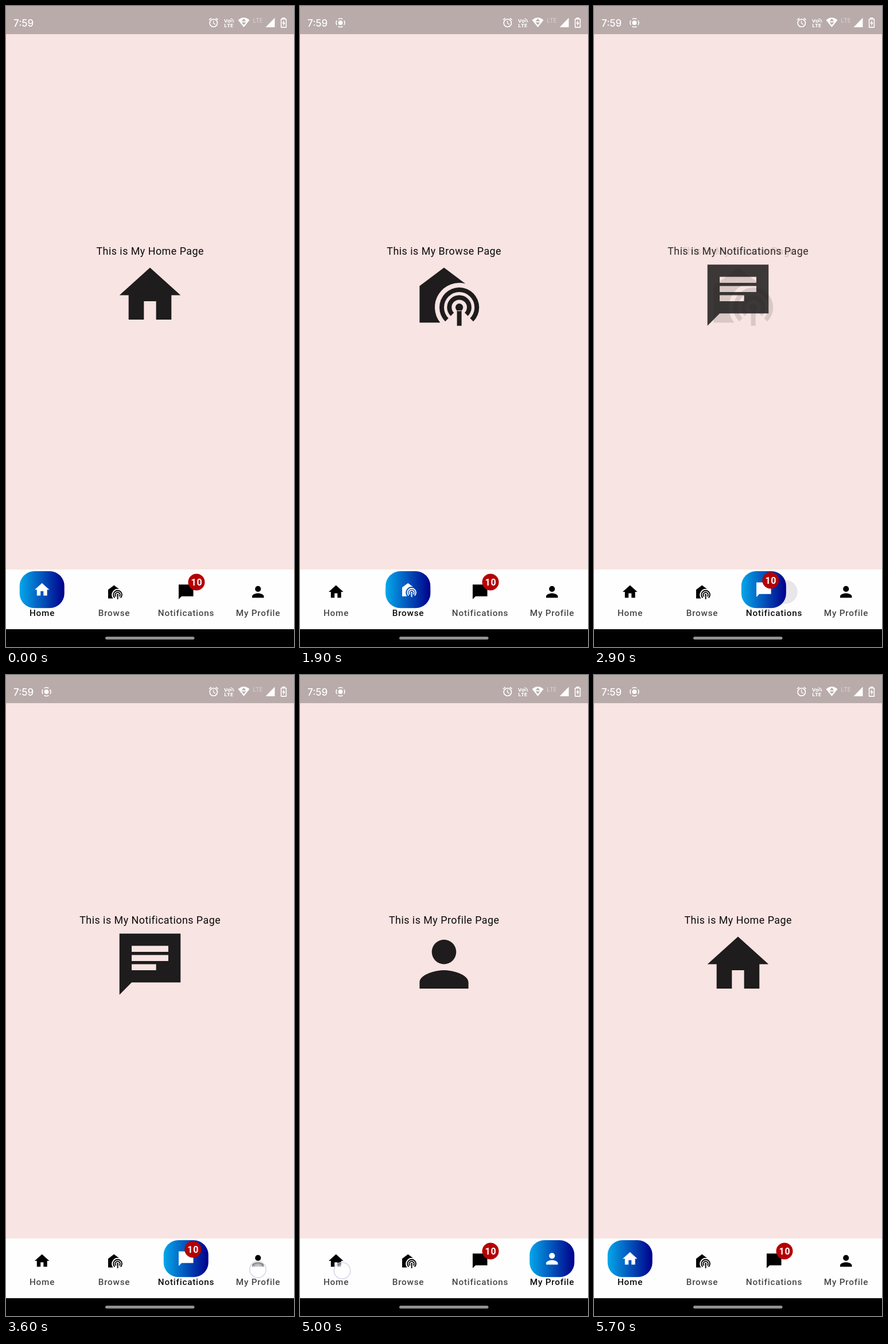
These frames come from a looping animation (502 px wide and 1116 px high, 7.1 s). An HTML page with a canvas:

```html
<!DOCTYPE html>
<html lang="en">
<head>
<meta charset="utf-8">
<title>Bottom navigation</title>
<style>
  html, body { margin: 0; width: 100%; height: 100%; overflow: hidden; }
  canvas { display: block; width: 502px; height: 1116px; }
</style>
</head>
<body>
<canvas id="stage" width="502" height="1116"></canvas>
<script>
const ctx = document.getElementById('stage').getContext('2d');
const LOOP = 7100, STEP = 100, DP = 1.278;
const INK = '#1e1c1d', ROBOTO = 'Roboto, sans-serif';

// Icons live on a 24-unit grid.
const HOUSE = new Path2D('M10 20v-6h4v6h5v-8h3L12 3 2 12h3v8z');
const CAST = new Path2D(
  'M12 3L4 9V21H10.755A8 8 0 0 1 19 8.25Z' +
  'M12.404 20.596A6.5 6.5 0 1 1 21.596 20.596L20.536 19.536A5 5 0 1 0 13.464 19.536Z' +
  'M14.172 18.828A4 4 0 1 1 19.828 18.828L18.768 17.768A2.5 2.5 0 1 0 15.232 17.768Z' +
  'M15.75 16a1.25 1.25 0 1 1 2.5 0a1.25 1.25 0 1 1-2.5 0zM16.25 17H17.75V22H16.25Z');
const BUBBLE = new Path2D('M22 2H2v20l4-4h16z');
const CHAT = new Path2D('M22 2H2v20l4-4h16zM6 9h12v2H6zM6 12h8v2H6zM6 6h12v2H6z');
const PERSON = new Path2D('M8 8a4 4 0 1 1 8 0a4 4 0 1 1-8 0zM12 14c-2.67 0-8 1.34-8 4v2h16v-2c0-2.66-5.33-4-8-4z');
const ALARM = new Path2D(
  'M22 5.72l-4.6-3.86-1.29 1.53 4.6 3.86zM7.88 3.39L6.6 1.86 2 5.71l1.29 1.53z' +
  'M12.5 8H11v6l4.75 2.85.75-1.23-4-2.37zM3 13a9 9 0 1 1 18 0a9 9 0 1 1-18 0z' +
  'M5 13a7 7 0 1 1 14 0a7 7 0 1 1-14 0z');

const tabs = [
  { label: 'Home', icon: HOUSE, big: HOUSE },
  { label: 'Browse', icon: CAST, big: CAST },
  { label: 'Notifications', icon: BUBBLE, big: CHAT },
  { label: 'My Profile', icon: PERSON, big: PERSON }
].map((tab, i) => ({ ...tab, x: 62.75 + i * 125.5 }));
const BADGED = 2;

const taps = [
  { at: 1500, from: 0, to: 1, x: 201, y: 1034, lag: 53 },
  { at: 2600, from: 1, to: 2, x: 314, y: 1035, lag: 53 },
  { at: 3600, from: 2, to: 3, x: 439, y: 1035, lag: 78 },
  { at: 5000, from: 3, to: 0, x: 73.5, y: 1037, lag: 53 }
];
const SLIDE = 324;

const clamp = v => Math.min(1, Math.max(0, v));
const smooth = v => v * v * (3 - 2 * v);

function rect(x, y, w, h, fill, r = 0) {
  ctx.fillStyle = fill;
  ctx.beginPath();
  ctx.roundRect(x, y, w, h, r);
  ctx.fill();
}

function disc(x, y, r, fill) {
  ctx.fillStyle = fill;
  ctx.beginPath();
  ctx.arc(x, y, r, 0, Math.PI * 2);
  ctx.fill();
}

function arc(x, y, r, from, to, width, color) {
  ctx.strokeStyle = color;
  ctx.lineWidth = width;
  ctx.beginPath();
  ctx.arc(x, y, r, from, to);
  ctx.stroke();
}

function poly(points, fill) {
  ctx.fillStyle = fill;
  ctx.beginPath();
  points.forEach(p => ctx.lineTo(...p));
  ctx.fill();
}

function text(str, x, y, font, color, spacing = 0, align = 'center') {
  ctx.font = font;
  ctx.letterSpacing = spacing + 'px';
  ctx.textAlign = align;
  ctx.fillStyle = color;
  ctx.fillText(str, x, y);
}

function icon(path, cx, cy, scale, color) {
  ctx.save();
  ctx.translate(cx - 12 * scale, cy - 12 * scale);
  ctx.scale(scale, scale);
  ctx.fillStyle = color;
  ctx.fill(path, 'evenodd');
  ctx.restore();
}

function castIcon(alpha) {
  ctx.globalAlpha = alpha;
  disc(70.5, 29.2, 3.9, '#fff');
  for (let i = 0; i < 4; i++) {
    const mid = i * Math.PI / 2;
    arc(70.5, 29.2, 7.4, mid - 0.56, mid + 0.56, 1.6, '#fff');
  }
  ctx.globalAlpha = 1;
}

function statusBar(t) {
  const white = '#fff', bar = '#b9abaa';
  rect(0, 0, 502, 49, bar);
  text('7:59', 13, 36, '500 17px Inter, sans-serif', white, 0, 'left');
  castIcon(clamp((t - 300) / 300));
  icon(ALARM, 361.8, 28.8, 0.83, white);

  const small = '700 9.5px "Open Sans", sans-serif';
  text('Vo', 380, 28.5, small, white, 0, 'left');
  text('LTE', 380, 37, small, white, 0, 'left');
  arc(391, 28, 3, -1.5, 0.1, 1.2, white);
  arc(391, 28, 5.8, -1.5, 0.1, 1.2, white);

  ctx.fillStyle = white;
  ctx.beginPath();
  ctx.moveTo(414.5, 37);
  ctx.lineTo(404.5, 24.5);
  ctx.quadraticCurveTo(414.5, 16, 424.5, 24.5);
  ctx.fill();
  poly([[410.5, 26.5], [414.5, 22], [418.5, 26.5]], bar);
  poly([[410.5, 28.5], [414.5, 33], [418.5, 28.5]], bar);

  text('LTE', 430, 29, '600 10.5px "Open Sans", sans-serif', '#d5cbca', 0, 'left');
  poly([[468.5, 20.5], [468.5, 37], [452.5, 37]], white);

  rect(481.5, 20, 5, 3, white);
  rect(478.8, 21.7, 10.4, 16.3, white, 1.5);
  rect(480.4, 23.4, 7.2, 12.9, bar, 0.5);
  poly([[484.7, 24.5], [481.2, 30.5], [483.5, 30.5], [483.2, 35.3], [486.8, 29], [484.6, 29]], white);
}

function page(tab, alpha) {
  if (alpha <= 0) return;
  ctx.globalAlpha = alpha;
  text(`This is ${tab.label.startsWith('My') ? '' : 'My '}${tab.label} Page`,
    251.2, 432.5, `400 17.9px ${ROBOTO}`, '#0c0a0b', 0.47);
  icon(tab.big, 251, 503.4, 100 * DP / 24, INK);
  ctx.globalAlpha = 1;
}

function badge(x, y) {
  disc(x, y, 14.5, '#b50003');
  text('10', x + 0.4, y + 5.8, `700 16px ${ROBOTO}`, '#fff', 0.6);
}

function navItem(tab, i, selected) {
  if (i === BADGED && selected) {
    const fade = ctx.createLinearGradient(0, 1008, 0, 1030);
    fade.addColorStop(0, '#000');
    fade.addColorStop(0.5, '#181818');
    fade.addColorStop(1, '#777');
    rect(301, 1007, 26, 22, fade);
  } else {
    icon(tab.icon, tab.x, 1020, DP, '#000');
    if (i === BADGED) badge(332, 1003);
  }
  text(tab.label, tab.x + 0.3, 1061.6, `500 15.34px ${ROBOTO}`,
    selected ? '#0d0d0d' : '#464849', 0.76);
}

function pill(x, current) {
  const fill = ctx.createLinearGradient(x - 39, 0, x + 39, 0);
  fill.addColorStop(0, '#04a7ea');
  fill.addColorStop(1, '#00008b');
  rect(x - 39, 984, 78, 64.3, fill, 25.6);
  icon(tabs[current].icon, x, 1016.2, DP, '#fff');
  if (current === BADGED) badge(x + 12, 1000);
}

function pointer(x, y) {
  const glow = ctx.createRadialGradient(x, y, 2, x, y, 14.5);
  glow.addColorStop(0, 'rgba(255,255,255,.9)');
  glow.addColorStop(0.6, 'rgba(255,255,255,.7)');
  glow.addColorStop(1, 'rgba(255,255,255,.3)');
  disc(x, y, 14.5, glow);
  arc(x, y, 14.3, 0, Math.PI * 2, 1.8, 'rgba(208,211,226,.8)');
}

function draw(t) {
  const tap = taps.findLast(p => t >= p.at) || { at: -LOOP, from: 0, to: 0, lag: 0 };
  const age = t - tap.at;
  const current = age >= STEP ? tap.to : tap.from;
  const move = smooth(clamp((age - tap.lag) / SLIDE));
  const from = tabs[tap.from], to = tabs[tap.to];

  rect(0, 0, 502, 1116, '#f8e4e2');
  statusBar(t);
  if (from === to) page(to, 1);
  else {
    page(from, 1 - move);
    page(to, move);
  }

  rect(0, 981, 502, 104, '#fffeff');
  const ripple = clamp((age - 100) / 150) * clamp((700 - age) / 350);
  if (ripple > 0) {
    ctx.globalAlpha = ripple;
    rect(to.x - 32 * DP, 1020 - 16 * DP, 64 * DP, 32 * DP, '#e8e6e9', 16 * DP);
    ctx.globalAlpha = 1;
  }
  tabs.forEach((tab, i) => navItem(tab, i, i === current));
  pill(from.x + (to.x - from.x) * move, current);
  if (age < 2 * STEP) pointer(tap.x, tap.y);

  rect(0, 1085, 502, 31, '#000');
  rect(173, 1098, 155.5, 5, '#929292', 2.5);
}

const start = performance.now();
function tick() {
  const t = (performance.now() - start) % LOOP;
  draw(Math.floor(t / STEP) * STEP);
  requestAnimationFrame(tick);
}
tick();
</script>
</body>
</html>
```
